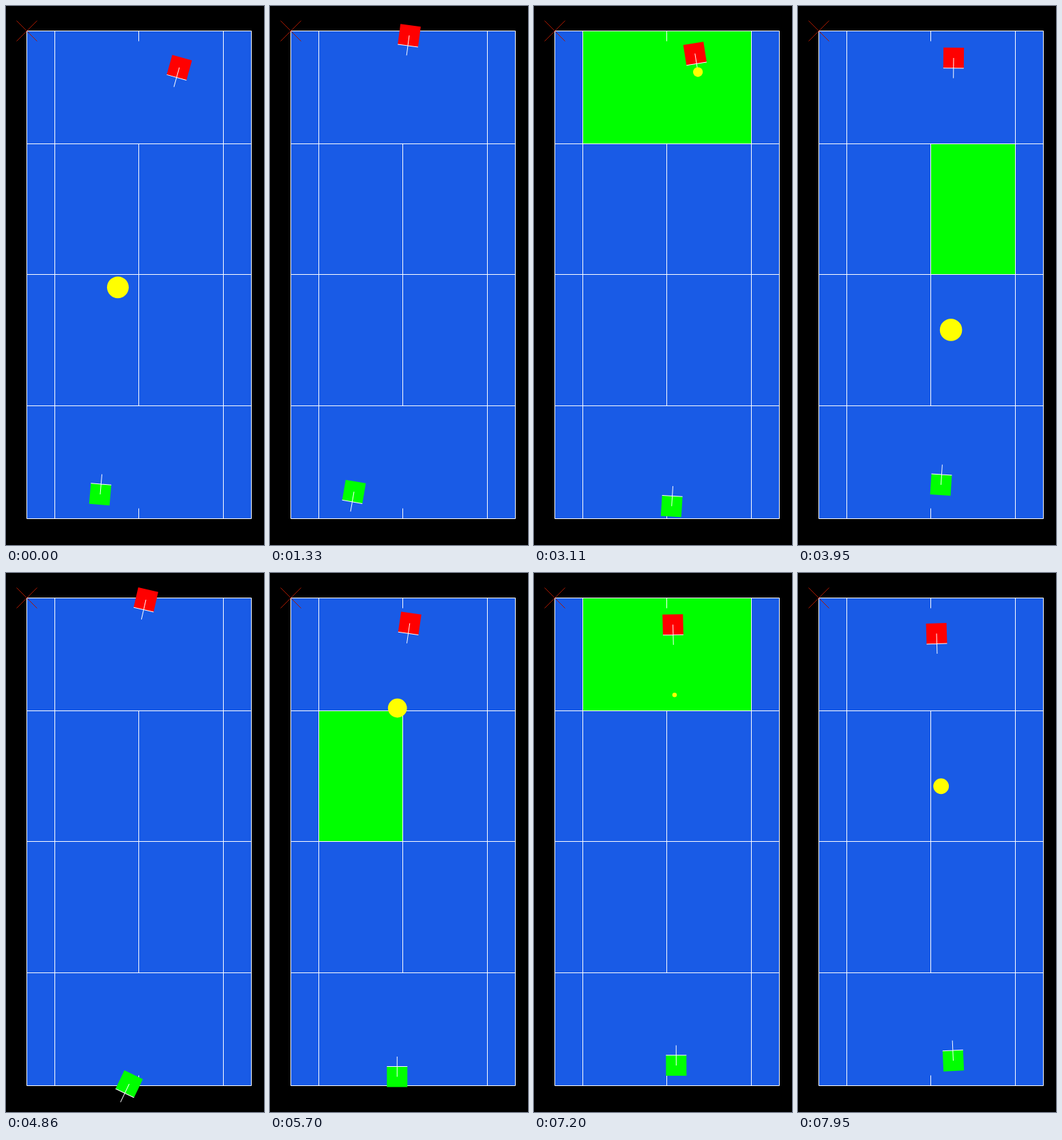
An HTML page with a canvas that plays this animation: 378x788 px, repeating every 8000 ms.

```html
<!DOCTYPE html>
<html lang="en">
<head>
<meta charset="utf-8">
<title>Court rally</title>
<style>
  html, body { margin: 0; width: 100%; height: 100%; overflow: hidden; background: #000; }
  canvas { display: block; width: 378px; height: 788px; }
</style>
</head>
<body>
<canvas id="stage" width="378" height="788"></canvas>
<script>
const LOOP = 8000, LIGHT_TIME = 385, BOUNCE = 0.85;
const ctx = document.getElementById('stage').getContext('2d');

const left = 30.5, alleyL = 71.5, mid = 194.5, alleyR = 318.5, right = 359.5;
const top_ = 36.5, serviceT = 201.5, net = 392.5, serviceB = 584.5, bottom = 749.5;

// Waypoints: time, x, y
const redPath = [
  [0, 254, 90], [740, 212, 41], [1330, 204, 43], [2270, 238, 101], [3100, 236, 70],
  [3450, 225, 42], [3950, 228, 76], [4600, 209, 32], [4860, 205, 39],
  [6540, 204.5, 108], [7640, 203, 56], [7950, 203, 88.5]
];
const greenPath = [
  [0, 138, 714], [740, 146, 727], [1330, 123, 710], [1560, 150, 732], [2270, 177, 708],
  [3560, 213, 742], [3950, 209.5, 700], [4860, 180.5, 747],
  [6540, 192, 726], [7950, 227.5, 713]
];

// Hits: time, x, y, share of the flight before the bounce
const rallies = [
  [[-270, 203, 108], [250, 128, 690], [740, 207, 70], [1330, 89, 905]],
  [[1500, 204, 65, 0.95], [1940, 182, 690, 1], [2270, 215, 160], [2740, 205, 690],
   [3110, 240, 95], [3560, 315, 790]],
  [[3760, 211, 727, 0.68], [4240, 244, 90], [4860, -85, 1300]],
  [[5250, 187, 712, 0.68], [5610, 186, 95], [6140, 190, 692, 0.95], [6550, 197, 116],
   [6900, 218, 690], [7250, 204, 95], [7600, 226, 690], [8115, 202, 135]]
];

const mix = (a, b, u) => a + (b - a) * u;

function segment(keys, t) {
  let i = 0;
  while (i < keys.length - 2 && t >= keys[i + 1][0]) i++;
  const [a, b] = [keys[i], keys[i + 1]];
  return { a, b, u: (t - a[0]) / (b[0] - a[0]) };
}

const along = (a, b, u) => ({ x: mix(a[1], b[1], u), y: mix(a[2], b[2], u) });

function playerAt(path, t) {
  const { a, b, u } = segment(path, t);
  const v = Math.min(1, u);
  return along(a, b, mix(v, v * v * (3 - 2 * v), 0.5));
}

function ballAt(t) {
  const { a, b, u } = segment(rallies.filter(r => r[0][0] <= t).pop(), t);
  const bounce = a[3] || BOUNCE;
  const w = Math.min(1, u / bounce);
  const low = bounce < 1 ? 3 : 6;
  const r = u <= bounce || bounce === 1
    ? mix(7, low, w) + 48 * w * (1 - w)
    : mix(low, 7, Math.min(1, (u - bounce) / (1 - bounce)));
  return { ...along(a, b, u), r };
}

// The part of the court that a bounce lights up
function zoneAt({ x, y }, isServe) {
  if (x < alleyL || x > alleyR || y < top_ || y > bottom) return null;
  if (y < serviceT) return [alleyL, top_, alleyR, serviceT];
  if (y > serviceB) return [alleyL, serviceB, alleyR, bottom];
  if (!isServe) return null;
  const [x1, x2] = x < mid ? [alleyL, mid] : [mid, alleyR];
  return y < net ? [x1, serviceT, x2, net] : [x1, net, x2, serviceB];
}

const lights = rallies.flatMap(rally => rally.slice(0, -1).flatMap((a, i) => {
  const b = rally[i + 1], bounce = a[3] || BOUNCE, isServe = bounce < 0.8;
  const zone = bounce < 1 && zoneAt(along(a, b, bounce), isServe);
  const landed = mix(a[0], b[0], bounce);
  return zone ? [{ from: isServe ? a[0] : landed, to: landed + LIGHT_TIME, zone }] : [];
}));

function strokeLines(color, lines) {
  ctx.strokeStyle = color;
  ctx.lineWidth = 1;
  ctx.beginPath();
  for (const [x1, y1, x2, y2] of lines) {
    ctx.moveTo(x1, y1);
    ctx.lineTo(x2, y2);
  }
  ctx.stroke();
}

function fillBox(color, [x1, y1, x2, y2]) {
  ctx.fillStyle = color;
  ctx.fillRect(x1, y1, x2 - x1, y2 - y1);
}

function drawCourt(t) {
  fillBox('#000', [0, 0, 378, 788]);
  fillBox('#195be6', [left, top_, right, bottom]);
  const light = lights.filter(l => t >= l.from && t < l.to).pop();
  if (light) fillBox('#0f0', light.zone);

  strokeLines('#fff', [
    ...[left, alleyL, alleyR, right].map(x => [x, top_, x, bottom]),
    ...[top_, serviceT, net, serviceB, bottom].map(y => [left, y, right, y]),
    [mid, serviceT, mid, serviceB],
    [mid, top_, mid, top_ + 15],
    [mid, bottom - 15, mid, bottom]
  ]);
  strokeLines('#a81800', [-15, 15].map(d => [left - 15, top_ + d, left + 15, top_ - d]));
}

// Players always face the ball
function drawPlayer(color, pos, ball) {
  ctx.save();
  ctx.translate(pos.x, pos.y);
  ctx.rotate(Math.atan2(ball.y - pos.y, ball.x - pos.x));
  fillBox(color, [-15, -15, 15, 15]);
  strokeLines('#fff', [[0, 0, 29.5, 0], [15, -15, 15, 15]]);
  ctx.restore();
}

function draw(t) {
  const ball = ballAt(t);
  drawCourt(t);
  drawPlayer('#f00', playerAt(redPath, t), ball);
  drawPlayer('#0f0', playerAt(greenPath, t), ball);
  ctx.fillStyle = '#ff0';
  ctx.beginPath();
  ctx.arc(ball.x, ball.y, ball.r, 0, 2 * Math.PI);
  ctx.fill();
}

const start = performance.now();
function tick() {
  draw((performance.now() - start) % LOOP);
  requestAnimationFrame(tick);
}
tick();
</script>
</body>
</html>
```
